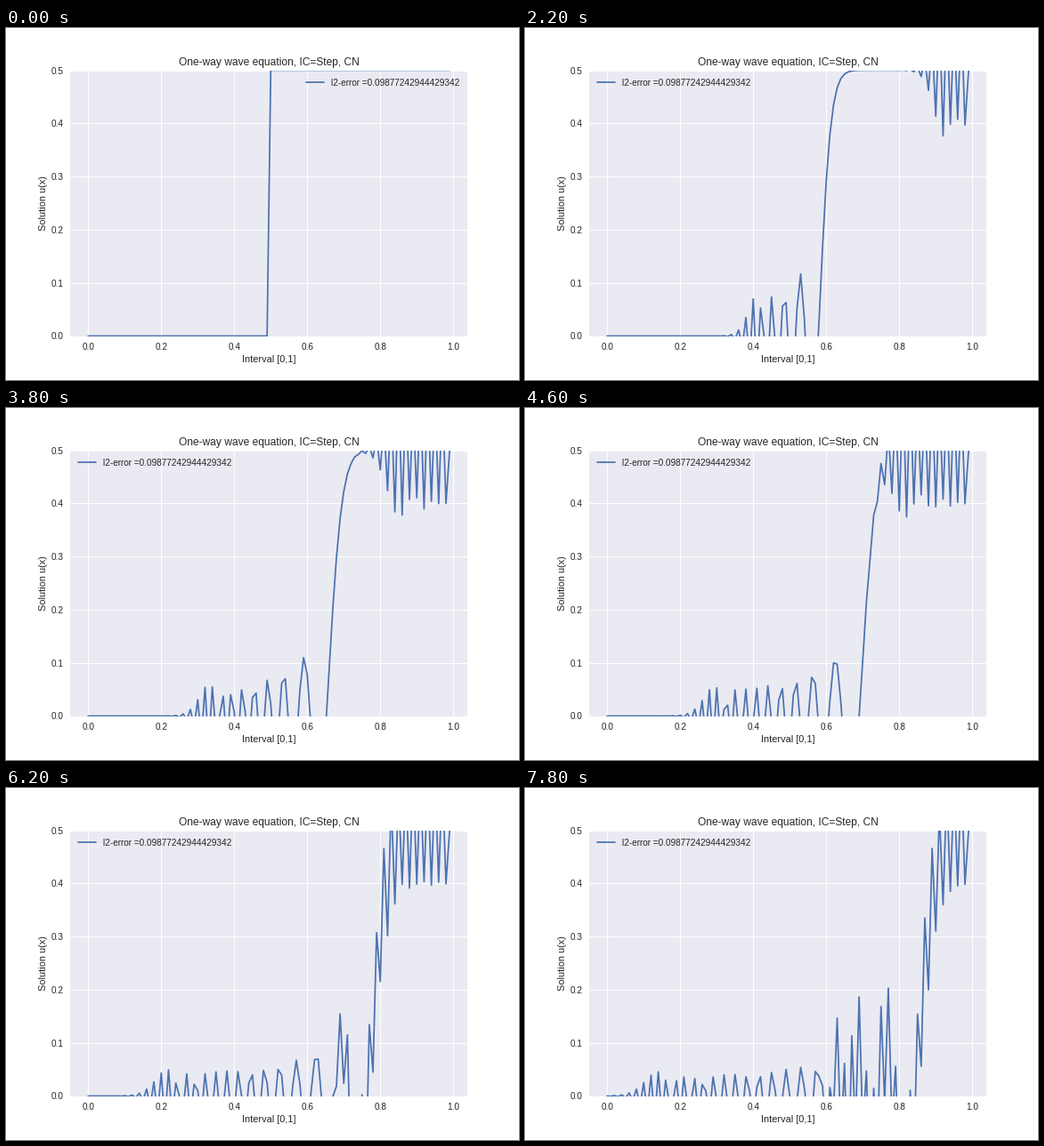
A matplotlib script for the animation above (8000 ms loop, 576x396 px).

```python
import numpy as np
import matplotlib.pyplot as plt
from matplotlib.animation import FuncAnimation

N = 100          # grid points
STEPS = 40       # frames in one loop
CFL = 1.0
DARK = "#262626"

plt.rcParams.update({
    "font.family": "Liberation Sans",
    "font.size": 10,
    "text.color": DARK,
    "axes.labelcolor": DARK,
    "axes.facecolor": "#EAEAF2",
    "axes.edgecolor": "white",
    "axes.linewidth": 0,
    "axes.axisbelow": True,
    "axes.grid": True,
    "axes.titlesize": 12,
    "axes.labelsize": 11,
    "grid.color": "white",
    "grid.linewidth": 1,
    "xtick.color": DARK,
    "ytick.color": DARK,
    "xtick.labelsize": 10,
    "ytick.labelsize": 10,
    "xtick.major.size": 0,
    "ytick.major.size": 0,
    "xtick.major.pad": 7,
    "ytick.major.pad": 7,
    "lines.solid_capstyle": "round",
    "legend.fontsize": 10,
    "legend.frameon": False,
})


def crank_nicolson(u, steps):
    """Advance u_t + u_x = 0 with both end values held fixed."""
    s = CFL / 4
    shift = s * (np.eye(N, k=1) - np.eye(N, k=-1))
    step = np.linalg.solve(np.eye(N) + shift, np.eye(N) - shift)
    states = [u]
    for _ in range(steps - 1):
        new = step @ states[-1]
        new[0], new[-1] = u[0], u[-1]
        states.append(new)
    return states


x = np.arange(N) / N
states = crank_nicolson(np.where(np.arange(N) >= N // 2, 0.5, 0.0), STEPS)

fig = plt.figure(figsize=(8, 5.5), dpi=72, facecolor="white")
ax = fig.add_axes([0.125, 0.125, 0.775, 0.755])
ax.set_xlim(-0.0495, 1.0395)
ax.set_ylim(0, 0.5)
ax.set_xticks(np.linspace(0, 1, 6))
ax.set_yticks(np.linspace(0, 0.5, 6))
ax.set_title("One-way wave equation, IC=Step, CN")
ax.set_xlabel("Interval [0,1]")
ax.set_ylabel("Solution u(x)")

line, = ax.plot(x, states[0], color="#4C72B0", lw=1.75,
                label="l2-error =0.09877242944429342")
legend = ax.legend(loc="upper right")


def update(k):
    line.set_ydata(states[k])
    legend.set_loc("upper left" if k else "upper right")
    return line, legend


anim = FuncAnimation(fig, update, frames=STEPS, interval=200,
                     repeat=True, repeat_delay=0, blit=False)
plt.show()
```
